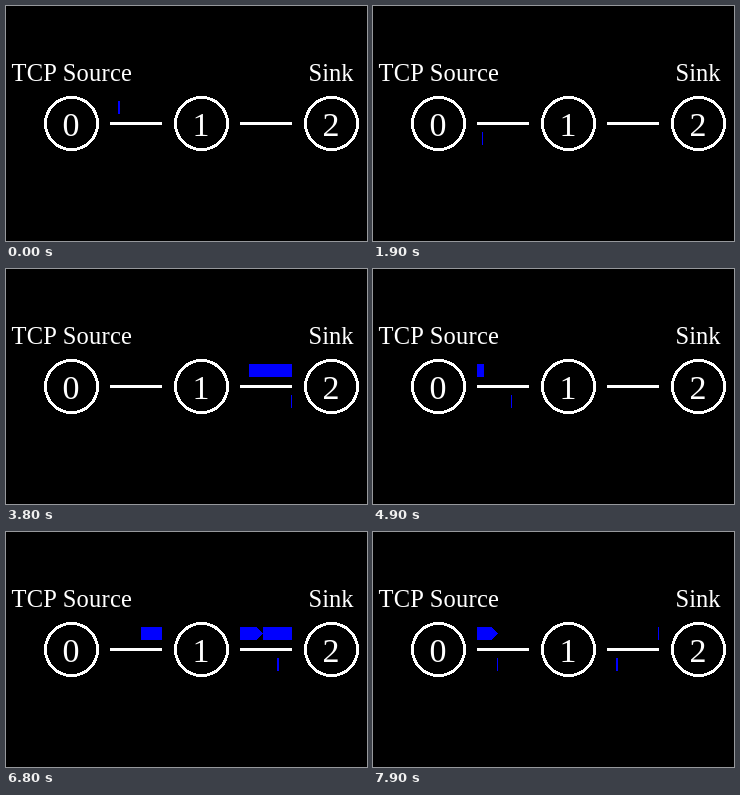
Animation of 361 by 235 pixels, one loop 8 s. Source, as an HTML page:

```html
<!DOCTYPE html>
<html lang="en">
<head>
<meta charset="utf-8">
<title>TCP slow start</title>
<style>
  html, body { margin: 0; width: 100%; height: 100%; overflow: hidden; background: #000; }
  svg { display: block; shape-rendering: crispEdges; }
  text { font-family: "Liberation Serif", "Times New Roman", serif; font-size: 24.5px; fill: #fff; }
  .wide { letter-spacing: .25px; }
  .id { font-size: 34px; text-anchor: middle; }
  .net { fill: none; stroke: #fff; stroke-width: 3; }
</style>
</head>
<body>
<svg width="361" height="235" viewBox="0 0 361 235">
  <g class="net">
    <circle cx="65.5" cy="117.5" r="26"/>
    <circle cx="195.5" cy="117.5" r="26"/>
    <circle cx="325.5" cy="117.5" r="26"/>
    <path d="M104 117.5H156M234 117.5H286"/>
  </g>
  <text class="wide" x="5.5" y="75">TCP Source</text>
  <text x="302.5" y="75">Sink</text>
  <text class="id" x="65" y="130">0</text>
  <text class="id" x="195" y="130">1</text>
  <text class="id" x="325" y="130">2</text>
  <path id="packets" fill="#00f"/>
</svg>
<script>
const LOOP = 8000, STEP = 100;
const LINK = 52, DELAY = 500, SPEED = LINK / DELAY;
const DATA = 416, ACK = 16;        // transmission times in ms
const HEIGHT = 13, ARROW = HEIGHT / 2;
const LEFT = [104, 234];           // left ends of the two links

// Every packet crosses both links; the sink answers with a small one.
const hops = [];
function send(start, tx) {
  const reply = start + 2 * (DELAY + tx);
  hops.push(
    { link: 0, dir: 1, start, tx },
    { link: 1, dir: 1, start: start + DELAY + tx, tx },
    { link: 1, dir: -1, start: reply, tx: ACK },
    { link: 0, dir: -1, start: reply + DELAY + ACK, tx: ACK }
  );
}

function burst(start, count) {
  for (let i = 0; i < count; i++) send(start + i * DATA, DATA);
}

send(-99, ACK);
burst(1965, 2);
burst(4829, 4);
burst(7693, 1);

const along = ms => Math.min(LINK, Math.max(0, ms * SPEED));

function outline({ link, dir, start, tx }, t) {
  const head = along(t - start), tail = along(t - start - tx);
  if (head <= tail) return "";
  const place = d => Math.floor(LEFT[link] + (dir > 0 ? d : LINK - d));
  const a = place(tail), b = place(head);
  const top = dir > 0 ? 95 : 126;
  const pointed = head < LINK && head - tail >= HEIGHT;
  return pointed
    ? `M${a} ${top}H${b - ARROW}l${ARROW} ${HEIGHT / 2}l${-ARROW} ${HEIGHT / 2}H${a}Z`
    : `M${a} ${top}H${b}v${HEIGHT}H${a}Z`;
}

const packets = document.getElementById("packets");
const begin = performance.now();

function frame() {
  const now = (performance.now() - begin) % LOOP;
  const t = Math.floor(now / STEP) * STEP;
  packets.setAttribute("d", hops.map(hop => outline(hop, t)).join(""));
  requestAnimationFrame(frame);
}
frame();
</script>
</body>
</html>
```
